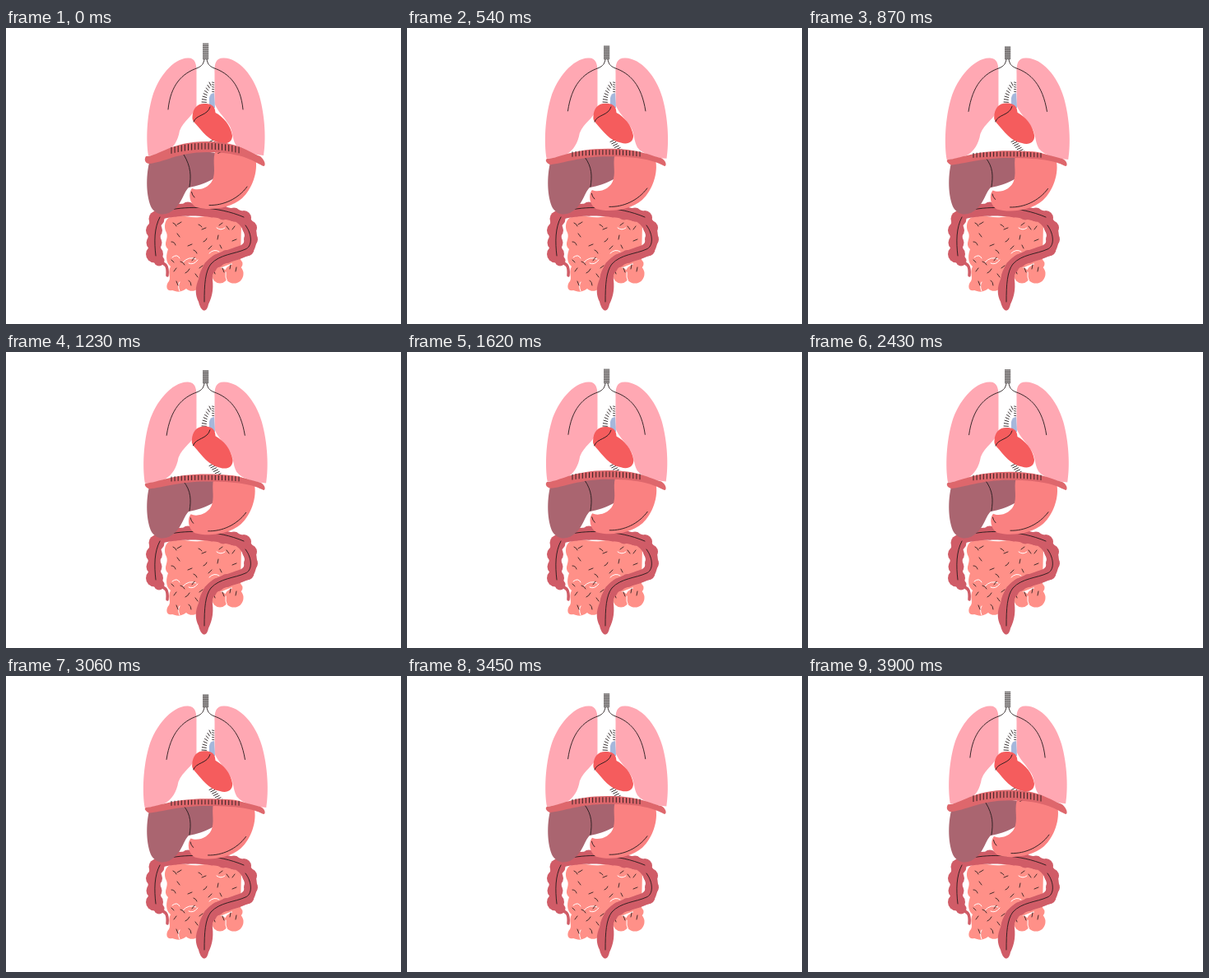
Recreate the animation shown at these times as an HTML page with a canvas. Size 480 by 360 pixels, loop 3930 ms.

```html
<!DOCTYPE html>
<html>
<head>
<meta charset="utf-8">
<style>
html, body { margin: 0; width: 100%; height: 100%; overflow: hidden; background: #fff; }
canvas { display: block; width: 480px; height: 360px; }
</style>
</head>
<body>
<canvas id="stage"></canvas>
<script>
const canvas = document.getElementById('stage');
const ratio = window.devicePixelRatio || 1;
canvas.width = 480 * ratio;
canvas.height = 360 * ratio;
const ctx = canvas.getContext('2d');

const LOOP = 3930;
const INK = '#241a1b';
const COLON = '#d05c67';
const BOWEL = '#ff9088';

const mix = (a, b, k) => a + (b - a) * k;

function fill(d, color) {
  ctx.fillStyle = color;
  ctx.fill(new Path2D(d));
}

function line(d, width = 0.9, color = INK) {
  ctx.strokeStyle = color;
  ctx.lineWidth = width;
  ctx.lineCap = 'round';
  ctx.lineJoin = 'round';
  ctx.stroke(new Path2D(d));
}

// Draws with a scale around a fixed point
function scaled(x, y, sx, sy, draw) {
  ctx.save();
  ctx.translate(x, y);
  ctx.scale(sx, sy);
  ctx.translate(-x, -y);
  draw();
  ctx.restore();
}

function blobs(list, color) {
  ctx.fillStyle = color;
  for (const [x, y, r] of list) {
    ctx.beginPath();
    ctx.arc(x, y, r, 0, 7);
    ctx.fill();
  }
}

function smallBowel() {
  fill('M200 230 C211 225 223 232 235 230 C250 227 271 229 286 237 L285 282 ' +
    'L250 296 L236 312 C232 322 223 321 219 317 C211 323 206 320 202 319 C194 321 194 312 198 308 ' +
    'C201 303 196 298 200 290 C193 285 195 274 197 269 C190 262 198 257 195 249 ' +
    'C191 242 193 232 200 230 Z', BOWEL);
  blobs([[277, 299, 11.5], [260, 301, 9.5], [281, 287, 6.5]], BOWEL);
  line('M202 279 Q208 274 211 280 M215 285 Q222 277 231 281 M233 282 Q228 289 222 286 ' +
    'M211 309 Q208 313 211 320 M267 297 Q266 303 269 309 M256 243 Q261 247 266 243 ' +
    'M247 274 Q253 268 259 272', 1, '#fff');
  line('M203 237 q3 1 4 4 M208 239 l5 -3 M234 239 q3 1 4 3 M259 240 l4 -3 M278 241 l-3 4 ' +
    'M208 250 l3 4 M238 245 l5 -2 M268 241 l3 4 M201 260 q4 0 5 4 M221 265 l5 -2 ' +
    'M240 260 q3 -1 4 -4 M257 257 l1 -5 M280 257 l-5 2 M228 270 q3 1 4 4 ' +
    'M246 269 l4 -4 M260 264 l2 4 M201 282 l3 3 M212 284 q4 1 5 4 M226 283 l3 -4 ' +
    'M235 292 l4 -3 M204 296 l3 -4 M218 298 q3 -1 5 -5 M230 299 l3 4 M252 294 l2 5 ' +
    'M263 292 l2 5 M273 288 l-1 5 M280 291 l-1 5 M207 308 l2 5 M222 307 q3 2 3 6', 0.85);
}

function colon() {
  line('M184 286 C195 284 197 291 196 301', 3.5, COLON);
  line('M181 277 C180 252 178 236 188 225 C211 219 246 219 283 229 C299 240 301 258 293 269 ' +
    'C276 278 260 277 249 289 Q242 297 241 312', 15, COLON);
  blobs([
    [183, 232, 9.5], [180, 246, 10], [180, 261, 9.5], [180.5, 275, 10.5], [186, 283, 6.5],
    [192, 223, 8.5], [206, 221, 8.5], [221, 220, 8.5], [236, 220, 8], [250, 222, 8.5],
    [264, 225, 8.5], [277, 227, 8.5], [289, 231, 9],
    [296, 243, 9], [297.5, 257, 8.5], [293, 269, 8.5], [281, 274, 7.5], [268, 278, 8],
    [257, 283, 8], [248, 291, 8], [243, 302, 8]
  ], COLON);
  fill('M235 303 C229 316 230 325 234 333 C237 346 244 347 246 336 C251 326 253 315 250 300 Z', COLON);
  line('M182 277 C180 260 180 243 187 230 M200 221 C220 217 256 216 289 230 ' +
    'M291 240 C300 252 299 266 291 269 C278 275 260 275 249 287 C242 296 241 312 241 333');
}

function liver(b) {
  const top = mix(152, 156, b);
  fill(`M214 ${top} C232 150 246 149 257 153 C257 169 256 181 251 184 C240 190 232 192 222 194 Z`, '#a7636f');
  fill(`M174 ${mix(162, 166, b)} C187 ${top + 3} 201 ${top} 215 ${top} C226 164 225 181 223 193 ` +
    'C216 199 214 212 206 219 C196 229 184 229 177 219 C170 205 170 180 174 164 Z', '#aa6570');
  line(`M216 ${top + 2} C225 169 225 180 223 193`);
}

function stomach(b) {
  ctx.save();
  ctx.translate(-1.5 * b, 2.5 * b);
  fill('M255 148 C271 146 291 148 303 158 C307 174 299 196 287 207 C271 221 245 222 231 218 ' +
    'C223 214 221 201 226 195 C234 199 249 194 252 182 C255 171 250 160 255 148 Z', '#fa8181');
  line('M247 215.5 C264 216 282 208 293 193 M225.5 199.5 Q226 203 229 206');
  ctx.restore();
}

function vessels() {
  fill('M247 98 L247 85 Q248 79 253 79 L254 97 Z', '#a5b7db');
  for (let i = 0; i < 8; i++) {
    const k = i / 7;
    const x = 238 + 9 * k ** 1.7;
    const y = 90 - 24 * k;
    line(`M${x} ${y} l${mix(5.5, 2, k)} ${mix(0.3, 4, k)}`, 0.9);
  }
  for (let i = 0; i < 5; i++) line(`M250.5 ${66 + i * 2.8} l2.2 .4`, 0.8);
  for (let i = 0; i < 7; i++) line(`M${247 + i * 1.8} ${138.5 + i * 2.3} l5 -2.3`, 0.9);
}

function heart(p) {
  scaled(252, 118, 1 + 0.025 * p, 1 + 0.055 * p, () => {
    fill('M226.5 108 C227 98 232 92 241 92 C249 92 254 94 254.5 103 C264 108 273 118 275 131 ' +
      'C275 139 268 142 260 139.5 C246 137 239 126 229 115 Q226 112 226.5 108 Z', '#f55c5d');
    line('M228 114 C231 105 245 107 248 96');
  });
}

function lungs(b) {
  const pink = '#ffa8b3';
  const tall = mix(1, 1.042, b);
  scaled(232, 36, mix(1, 1.075, b), tall, () => fill(
    'M221 36.5 C230 36 232 44 231.5 56 L231.5 95 C227 108 216 112 211 125 C209 137 204 145 196 150 ' +
    'C189 153 180 155 173 155 C170 137 171 107 178 83 C185 60 203 37 221 36.5 Z', pink));
  scaled(253, 36, mix(1, 1.055, b), tall, () => fill(
    'M265 36.5 C255 36 253 43 253.5 55 L253.5 92 C257 101 264 107 269 115 C276 123 274 133 279 142 ' +
    'C286 151 302 154 313 155 C316 137 315 108 308 83 C301 58 283 37 265 36.5 Z', pink));
}

function airway(b) {
  const top = mix(19, 23, b);
  const x = mix(197, 195, b);
  const right = mix(288, 290.5, b);
  const y = mix(99, 101.5, b);
  line(`M241 38 C240 44 238 46 233 48.5 C214 55 200 69 ${x} ${y} ` +
    `M244 38 C245 44 247 46 252 48.5 C271 55 285 69 ${right} ${y}`);
  ctx.fillStyle = '#b5b2b2';
  ctx.fillRect(239, top, 7.2, 38 - top);
  for (let i = 0; i < 9; i++) line(`M239.4 ${mix(top, 37.6, i / 8)} h6.4`, 0.8, '#4a4646');
}

function diaphragm(b) {
  const m = (a, z) => mix(a, z, b);
  const top = m(138, 149.5);
  const low = m(151, 158);
  fill(`M170 ${m(156, 160)} C186 ${m(156, 159)} 200 ${top} 244 ${top} ` +
    `C282 ${top} 294 ${m(151, 156)} 309 ${m(156, 159)} C315 161 316 168 313 168 ` +
    `C303 ${m(164, 163)} 290 ${low} 244 ${low} C210 ${low} 190 ${m(164, 165)} 174 ${m(165, 166.5)} ` +
    `C170 165 167 161 170 ${m(156, 160)} Z`, '#de676c');
  for (let i = 0; i < 21; i++) {
    const x = 201 + i * 4.1;
    const u = (x - 243) / 42;
    const y = m(140.2, 151) + u * u * m(5.2, 1.5);
    line(`M${x} ${y} v${m(7, 5)}`, 0.9);
  }
}

function render(t) {
  const breath = Math.abs(Math.sin(Math.PI * t / (LOOP / 2)));
  const beat = Math.sin(Math.PI * t / (LOOP / 8)) ** 2;
  ctx.setTransform(ratio, 0, 0, ratio, 0, 0);
  ctx.fillStyle = '#fff';
  ctx.fillRect(0, 0, 480, 360);
  smallBowel();
  colon();
  liver(breath);
  stomach(breath);
  lungs(breath);
  vessels();
  heart(beat);
  airway(breath);
  diaphragm(breath);
}

const start = performance.now();
function tick() {
  render((performance.now() - start) % LOOP);
  requestAnimationFrame(tick);
}
tick();
</script>
</body>
</html>
```
